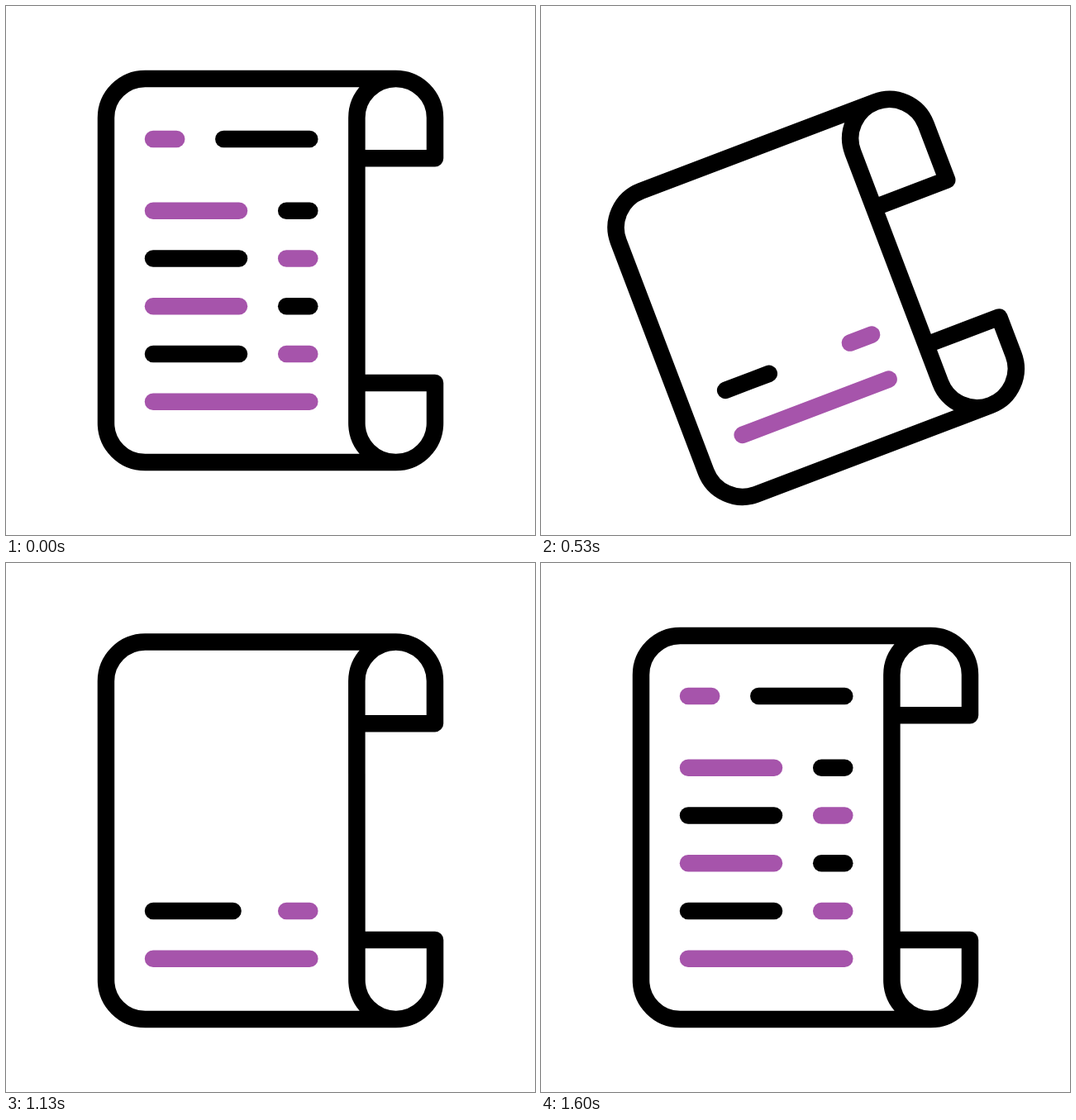
An HTML page that plays this animation: 640x640 px, repeating every 2000 ms.

```html
<!DOCTYPE html>
<html lang="en">
<head>
<meta charset="utf-8">
<title>Receipt scroll</title>
<style>
  html, body { margin: 0; width: 100%; height: 100%; overflow: hidden; background: #fff; }
  svg { display: block; width: 100vw; height: 100vh; }
  path { fill: none; stroke: #000; stroke-width: 20.5; stroke-linecap: round; stroke-linejoin: round; }
  .accent { stroke: #a654ab; }
</style>
</head>
<body>
<svg viewBox="0 0 640 640">
  <g id="scroll"><path id="outline"/></g>
</svg>
<script>
const LOOP = 2000, FPS = 30, LAST = 48;
const scroll = document.getElementById('scroll');
const outline = document.getElementById('outline');

// Text bars in erasing order: x1, x2, y, accent
const bars = [[178, 206.2, 161, 1], [263.3, 367.3, 161, 0]];
[247.7, 305.5, 363.2, 421].forEach((y, i) => {
  const accent = 1 - i % 2;
  bars.push([178, 282, y, accent], [339.2, 367.3, y, 1 - accent]);
});
bars.push([178, 367.3, 478.8, 1]);

let total = 0;
const lines = bars.map(([x1, x2, y, accent]) => {
  const el = document.createElementNS('http://www.w3.org/2000/svg', 'path');
  if (accent) el.setAttribute('class', 'accent');
  scroll.append(el);
  const line = { el, x1, y, length: x2 - x1, start: total };
  total += line.length;
  return line;
});

// Steps: [frame, value]
const angle = [[0, 0], [17.4, -21.2], [28.05, 8.4], [38.2, -5], [48, 0]];
const drop = [[6.7, 0], [23.2, 120], [35.95, 0]];
const erased = [[3.9, 0], [22.5, 1], [24.4, 1], [47.7, 0]];

const clamp = (v, lo, hi) => Math.min(hi, Math.max(lo, v));
const smooth = t => t * t * (3 - 2 * t);
const soft = t => t + 0.4 * (smooth(t) - t);

function valueAt(steps, frame, ease = smooth) {
  let value = steps[0][1];
  for (let i = 1; i < steps.length; i++) {
    const [f0, v0] = steps[i - 1], [f1, v1] = steps[i];
    if (frame >= f0) value = v0 + (v1 - v0) * ease(clamp((frame - f0) / (f1 - f0), 0, 1));
  }
  return value;
}

function outlinePath(d) {
  const top = 88 + d, bend = top + 47.3, flap = 184.2 + d * 1.32;
  const arc = 'A47.3 47.3 0 0 0 ';
  return `M471.7 ${top}H168.3${arc}121 ${bend}V504.7${arc}168.3 552H471.7` +
    `M424.4 ${flap}H519V${bend}${arc}424.4 ${bend}V504.7${arc}519 504.7V456H424.4`;
}

function draw(time) {
  const frame = Math.min(LAST, Math.floor((time + 3.4) * FPS / 1000));
  scroll.setAttribute('transform', `rotate(${valueAt(angle, frame)} 320 320)`);
  outline.setAttribute('d', outlinePath(valueAt(drop, frame)));

  const gone = total * valueAt(erased, frame, frame < 24 ? soft : smooth);
  for (const { el, x1, y, length, start } of lines) {
    const left = length - clamp(gone - start, 0, length);
    el.setAttribute('d', left > 0.01 ? `M${x1} ${y}h${left}` : '');
  }
}

function tick() {
  draw(performance.now() % LOOP);
  requestAnimationFrame(tick);
}
tick();
</script>
</body>
</html>
```
